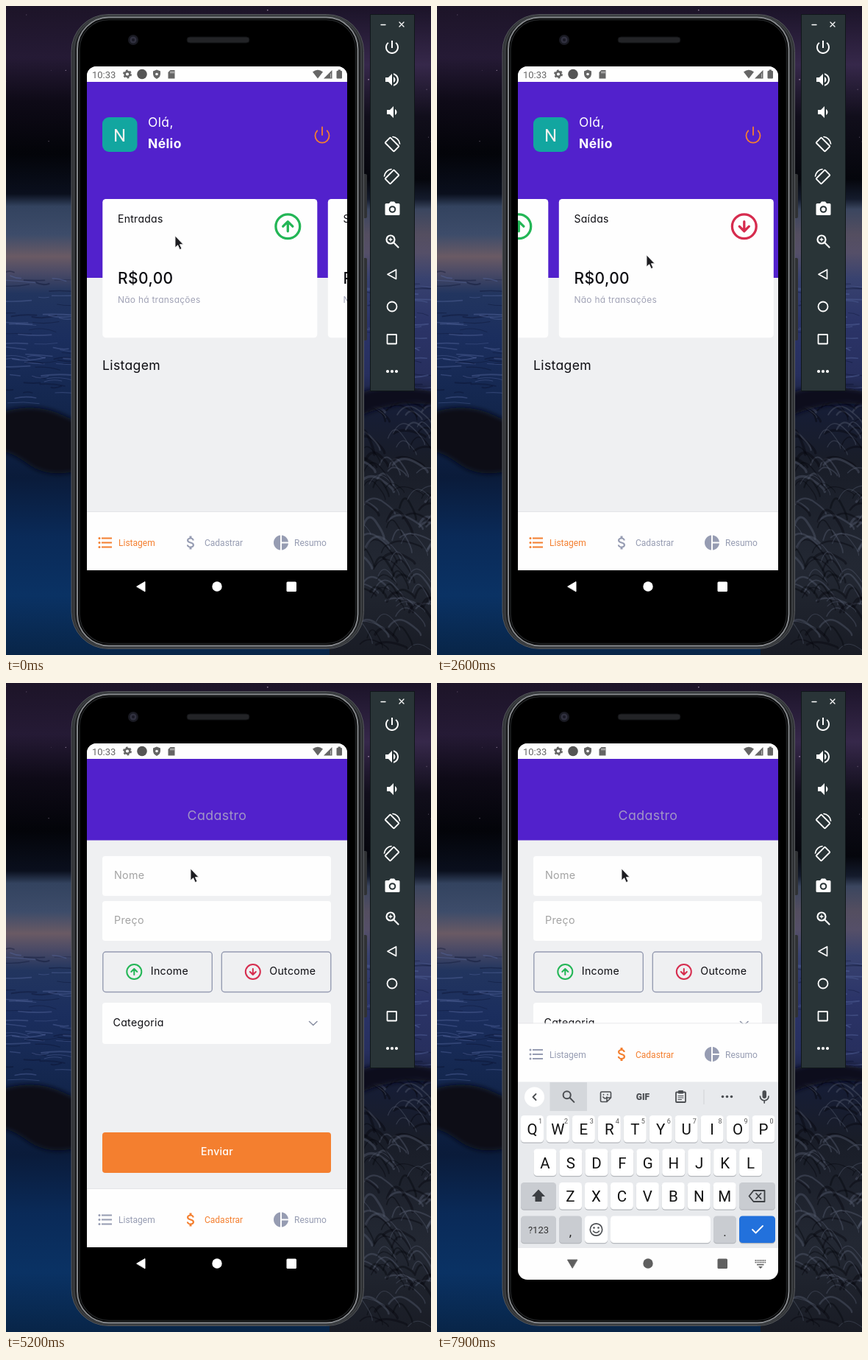
An HTML page that plays this animation: 578 by 881 pixels, repeating every 8000 ms.

```html
<!DOCTYPE html>
<html lang="pt-BR">
<head>
<meta charset="utf-8">
<title>Finanças</title>
<style>
  html, body { margin: 0; width: 100%; height: 100%; overflow: hidden; background: #000; }
  svg { position: fixed; left: 0; top: 0; display: block; }
  text { font-family: Inter, "Open Sans", sans-serif; letter-spacing: .02em; font-feature-settings: "cv11"; }
  .r text, text.r { font-family: Roboto, Arial, sans-serif; letter-spacing: 0; }
  .mid { text-anchor: middle; }
</style>
</head>
<body>
<svg id="stage" width="578" height="881" viewBox="0 0 578 881"></svg>
<script>
const ORANGE = '#f47f2f', PURPLE = '#5221cc', GREEN = '#23b656', RED = '#d62c4e', MUTED = '#969cb2';
const LOOP = 8000, STEP = 100;

// ---------- helpers ----------
const rect = (x, y, w, h, fill, rx = 0, more = '') =>
  `<rect x="${x}" y="${y}" width="${w}" height="${h}" rx="${rx}" fill="${fill}" ${more}/>`;
const circle = (x, y, r, fill, more = '') => `<circle cx="${x}" cy="${y}" r="${r}" fill="${fill}" ${more}/>`;
const text = (x, y, size, str, fill = '#0d0d12', more = '') =>
  `<text x="${x}" y="${y}" font-size="${size}" fill="${fill}" ${more}>${str}</text>`;
const line = (d, color, w = 2, more = '') =>
  `<path d="${d}" fill="none" stroke="${color}" stroke-width="${w}" stroke-linecap="round" stroke-linejoin="round" ${more}/>`;
const shape = (d, fill = '#fff', more = '') => `<path d="${d}" fill="${fill}" ${more}/>`;
const at = (x, y, body, scale = 1) => `<g transform="translate(${x} ${y}) scale(${scale})">${body}</g>`;
// 24-unit icon centred on a point
const icon = (x, y, scale, body) => at(x, y, `<g transform="translate(-12 -12)">${body}</g>`, scale);
const grad = (id, stops) => `<linearGradient id="${id}" x1="0" y1="0" x2="0" y2="881" gradientUnits="userSpaceOnUse">` +
  stops.map(([y, c]) => `<stop offset="${y / 881}" stop-color="${c}"/>`).join('') + '</linearGradient>';

let seed = 11;
const rnd = (a = 0, b = 1) => {
  seed = (seed * 16807) % 2147483647;
  return a + (b - a) * seed / 2147483647;
};
const many = (n, fn) => Array.from({ length: n }, (_, i) => fn(i)).join('');

// ---------- icons ----------
const arrow = (up, c) => line('M22 12A10 10 0 1 1 2 12A10 10 0 1 1 22 12', c) +
  line(up ? 'M12 16V8M8 12L12 8L16 12' : 'M12 8V16M8 12L12 16L16 12', c);
const dollar = line('M12 1V23M17 5H9.5a3.5 3.5 0 0 0 0 7h5a3.5 3.5 0 0 1 0 7H6', '#fff');
const money = shape('M11.8 10.9c-2.27-.59-3-1.2-3-2.15 0-1.09 1.01-1.85 2.7-1.85 1.78 0 2.44.85 2.5 2.1h2.21c-.07-1.72-1.12-3.3-3.21-3.81V3h-3v2.16c-1.94.42-3.5 1.68-3.5 3.61 0 2.31 1.91 3.46 4.7 4.13 2.5.6 3 1.48 3 2.41 0 .69-.49 1.79-2.7 1.79-2.06 0-2.87-.92-2.98-2.1h-2.2c.12 2.19 1.76 3.42 3.68 3.83V21h3v-2.15c1.95-.37 3.5-1.5 3.5-3.55 0-2.84-2.43-3.81-4.7-4.4z', 'currentColor');
const pie = shape('M11 2v20c-5.07-.5-9-4.79-9-10s3.93-9.5 9-10zm2.03 0v8.99H22c-.47-4.74-4.24-8.52-8.97-8.99zm0 11.01V22c4.74-.47 8.5-4.25 8.97-8.99z', 'currentColor');
const list = many(3, i => circle(4, 6 + i * 6, 1.5, 'currentColor') + rect(7, 5 + i * 6, 14, 2, 'currentColor'));
const power = line('M18.36 6.64a9 9 0 1 1-12.73 0M12 2V12', ORANGE, 1.7);
const lens = c => line('M15 9.5A5.5 5.5 0 1 1 4 9.5A5.5 5.5 0 1 1 15 9.5M14 14L20 20', c, 2.2);
const dots = (x, y, c, r = 1.8) => [-6, 0, 6].map(d => circle(x + d, y, r, c)).join('');

// ---------- wallpaper ----------
function wallpaper() {
  const left = [[0, '#1d1428'], [70, '#251a35'], [130, '#0e0a17'], [200, '#030409'], [255, '#0a0f1d'], [272, '#33435f'],
    [310, '#3d4c6a'], [340, '#6a5a64'], [362, '#4a4a66'], [390, '#22355f'], [450, '#1b2e5e'], [535, '#14274f'],
    [640, '#0a1b3a'], [720, '#0a2a58'], [800, '#0a3264'], [881, '#082548']];
  const right = [[0, '#1b1328'], [80, '#36284a'], [150, '#110e1b'], [235, '#05060c'], [262, '#141b2c'], [276, '#3b465f'],
    [310, '#544e60'], [335, '#554f68'], [370, '#38426f'], [430, '#2b3468'], [500, '#272f5e'], [545, '#161d36'],
    [620, '#191d28'], [760, '#232833'], [881, '#191c25']];
  const stars = many(40, () => circle(rnd(0, 578), rnd(0, 230), rnd(.3, .9), '#c9b4cf', `opacity="${rnd(.2, .8)}"`));
  const ripples = many(130, () => {
    const x = rnd() < .5 ? rnd(-20, 80) : rnd(478, 560), y = rnd(360, 540), w = rnd(12, 45);
    return line(`M${x} ${y}q${w / 2} ${rnd(-5, 5)} ${w} ${rnd(-2, 4)}`, rnd() < .5 ? '#5a6ca4' : '#0a1230', rnd(.8, 2.2), 'opacity=".4"');
  });
  const rock = many(120, () => {
    const x = rnd(465, 575), y = rnd(535, 880), w = rnd(12, 30), h = rnd(6, 26);
    return line(`M${x} ${y}q${w * .4} ${-h} ${w} ${-h * .3}t${w * .6} ${h}`,
      rnd() < .5 ? '#565e70' : '#05070c', rnd(1, 3.5), 'opacity=".42"');
  });
  return `<defs>${grad('wl', left)}${grad('wr', right)}
    <filter id="soft" x="-30%" y="-30%" width="160%" height="160%"><feGaussianBlur stdDeviation="3"/></filter></defs>` +
    rect(0, 0, 578, 881, 'url(#wl)') + rect(440, 0, 138, 881, 'url(#wr)') + stars + ripples + rock +
    `<g filter="url(#soft)">${shape('M-20 556Q30 536 70 552T110 580V628Q60 644 30 622T-20 604Z', '#070a14')}
     ${shape('M470 530Q520 505 600 528V545Q530 530 470 562Z', '#0b0f1d')}</g>`;
}

// ---------- phone body and emulator bar ----------
const body =
  rect(485, 228, 6, 60, '#303235', 2) + rect(485, 342, 6, 112, '#303235', 2) +
  rect(89, 11.5, 397.5, 861, '#2d2f32', 50, 'stroke="#56595d"') +
  rect(92.5, 13.5, 390.5, 857, '#1a1b1d', 47, 'stroke="#3b3e41" stroke-width="2.5"') +
  rect(97, 15.5, 381.5, 853, '#000', 43, 'stroke="#84878b" stroke-width="2"') +
  rect(100, 18.5, 375.5, 847, '#000', 40, 'stroke="#222426" stroke-width="1.5"') +
  circle(173, 46, 7, '#191a22') + circle(173, 46, 4.5, '#30303f') + circle(173, 46, 2, '#191924') +
  rect(246, 42, 85, 8, '#222326', 4, 'stroke="#111214"');

const turn = `<rect x="-8.500" y="-5" width="17" height="10" rx="1" transform="rotate(45)" fill="none" stroke="#fff" stroke-width="1.9"/>` +
  line('M1 -10.500A11 11 0 0 1 10.500 -1', '#fff', 1.7);
const toolbar = rect(495.5, 11.5, 60, 511, '#293437', 0, 'stroke="#10171a"') +
  line('M510 25.5H516M535 22L541 28M541 22L535 28', '#fff', 1.3) +
  icon(525, 56, 1, shape('M13 3h-2v10h2V3zm4.83 2.17l-1.42 1.42C17.99 7.86 19 9.81 19 12c0 3.87-3.13 7-7 7s-7-3.13-7-7c0-2.19 1.01-4.14 2.58-5.42L6.17 5.17C4.23 6.82 3 9.26 3 12c0 4.97 4.03 9 9 9s9-4.03 9-9c0-2.74-1.23-5.18-3.17-6.83z')) +
  icon(525, 100, 1, shape('M3 9v6h4l5 5V4L7 9H3zm13.5 3c0-1.77-1.02-3.29-2.5-4.03v8.05c1.48-.73 2.5-2.25 2.5-4.02zM14 3.23v2.06c2.89.86 5 3.54 5 6.71s-2.11 5.85-5 6.71v2.06c4.01-.91 7-4.49 7-8.77s-2.99-7.86-7-8.77z')) +
  icon(525, 144, 1, shape('M18.5 12c0-1.77-1.02-3.29-2.5-4.03v8.05c1.48-.73 2.5-2.25 2.5-4.02zM5 9v6h4l5 5V4L9 9H5z')) +
  at(525, 188, turn) + `<g transform="translate(525 232) scale(-1 1)">${turn}</g>` +
  shape('M517 268h4l2-2.5h5l2 2.5h4q1.5 0 1.5 1.5v13q0 1.5-1.5 1.5h-17q-1.5 0-1.5-1.5v-13q0-1.5 1.5-1.5Z') +
  circle(525.5, 276, 3.8, '#fff', 'stroke="#293437" stroke-width="2"') +
  icon(525.5, 319.5, 1, lens('#fff') + line('M7.5 9.5H11.5M9.5 7.5V11.5', '#fff', 1.3)) +
  line('M530.5 358V370.5L519 364.2Z', '#fff', 1.7) + circle(525, 408, 6.5, 'none', 'stroke="#fff" stroke-width="1.8"') +
  rect(518.5, 446, 12.5, 12.5, 'none', .5, 'stroke="#fff" stroke-width="1.8"') + dots(525, 496, '#fff', 2.1);

// ---------- app screens ----------
const INK = '#656565';
const status = rect(110, 82, 354, 21, '#fefefe') + text(117, 97.5, 13, '10:33', INK, 'class="r"') +
  circle(165, 92.5, 3.4, 'none', `stroke="${INK}" stroke-width="2.6"`) +
  circle(165, 92.5, 5, 'none', `stroke="${INK}" stroke-width="2" stroke-dasharray="2.6 2.636"`) +
  circle(185, 92.5, 6.8, '#555') +
  shape('M205 86.5L210 88.5V92.5Q209.5 97 205 99Q200.5 97 200 92.5V88.5Z', INK) + circle(205, 92.5, 1.8, '#fefefe') +
  shape('M223.5 87H229.5V98.5H220.5V90Z', INK) + line('M224 89V91M226 89V91M228 89V91', '#fefefe', .8) +
  shape('M417 89.5Q424 84 431 89.5L424 98.5Z', INK) + shape('M443.5 87V98.5H432Z', INK) + line('M441.5 92V97', '#bbb', 1) +
  rect(449.5, 88, 7.5, 10.5, INK, 1) + rect(451.5, 86.5, 3.5, 2, INK);

function card(i, title, bg, ink, note, glyph) {
  return at(131.3 + i * 306.5, 262, rect(0, 0, 292, 188.3, bg, 4.5) + text(20.7, 32, 14, title, ink) +
    text(20.7, 115, 21, 'R$0,00', ink, 'font-weight="500"') + text(20.7, 141, 12, 'Não há transações', note) +
    icon(252, 37.2, 1.64, glyph));
}
const home = rect(110, 103, 354, 266, PURPLE) +
  rect(131, 151, 47.5, 47, '#12a6a0', 9) + text(154.5, 184, 24, 'N', '#f4f1ee', 'class="r mid"') +
  text(193, 164, 17.5, 'Olá,', '#fff') + text(193, 193, 17.5, 'Nélio', '#fff', 'font-weight="700"') +
  icon(430, 175, 1.06, power) +
  `<g id="cards">${card(0, 'Entradas', '#fefefe', '#0d0d12', '#a1a3b6', arrow(true, GREEN))}` +
  card(1, 'Saídas', '#fefefe', '#0d0d12', '#a1a3b6', arrow(false, RED)) +
  card(2, 'Total', ORANGE, '#fff', '#fff', dollar) + '</g>' +
  shape('M458 262Q427 356 458 450H464V262Z', '#e2dfe9', 'id="glow"') +
  text(131, 493.5, 17.6, 'Listagem');

const choice = (x, name, up) => rect(x, 365, 148.5, 54.5, 'none', 4, 'stroke="#969cb2" stroke-width="1.4"') +
  icon(x + 42.5, 392, 1, arrow(up, up ? GREEN : RED)) + text(x + 65, 396, 14.2, name);
const form = rect(110, 103, 354, 110.5, PURPLE) + text(287, 186, 17.8, 'Cadastro', '#a195c6', 'class="mid"') +
  rect(131, 235, 311, 54, '#fefefe', 4) + text(147, 265.5, 14.3, 'Nome', '#a3a3a3') +
  rect(131, 296, 311, 54, '#fefefe', 4) + text(147, 326.5, 14.3, 'Preço', '#a3a3a3') +
  rect(147, 250, 2, 24, '#0f9b8c', 0, 'id="caret"') +
  choice(131.8, 'Income', true) + choice(293.3, 'Outcome', false) +
  rect(131, 434, 311, 56, '#fefefe', 4) + text(145.5, 465.5, 14.2, 'Categoria') +
  line('M412.5 459.5L417.8 464.5L423 459.5', '#8d93a5', 1.6) +
  rect(131, 610, 311, 55, ORANGE, 4) + text(287, 641, 14, 'Enviar', '#fff', 'class="mid" font-weight="500"');

const tab = (id, iconX, textX, glyph, name) => `<g id="${id}">${icon(iconX, 728.5, 1, glyph)}` +
  text(textX, 733, 12, name, 'currentColor') + '</g>';
const tabs = `<g id="tabs" class="r">${rect(110, 686, 354, 1, '#e3e4e8')}${rect(110, 687, 354, 310, '#fefefe')}` +
  tab('tabList', 135, 153, list, 'Listagem') + tab('tabAdd', 251.5, 270, money, 'Cadastrar') +
  tab('tabSum', 374, 392, pie, 'Resumo') + '</g>';

// ---------- keyboard ----------
const KEY = '#fff', ALT = '#c9ccd1', DARK = '#4b4e52';
const key = (x, y, w, fill = KEY, body = '') =>
  rect(x, y + 1.2, w, 36.5, '#b5b8bd', 4.5) + rect(x, y, w, 36.5, fill, 4.5) + at(x + w / 2, y + 18.5, body);
const keyRow = (letters, x0, y, nums) => [...letters].map((c, i) =>
  key(x0 + i * 34.95, y, 31, KEY, text(0, 7.5, 20.5, c, '#111', 'class="mid"') +
    (nums ? text(11, -8, 9, (i + 1) % 10, '#555', 'class="mid"') : ''))).join('');
const board = `<g id="board" class="r">${rect(110, 541.5, 354, 226, '#e8eaed')}${rect(110, 767, 354, 300, '#fefefe')}` +
  rect(153.5, 542, 50.5, 39, '#d4d7db') + circle(132.5, 562, 13.5, '#fff') + line('M134.5 558L130.5 562L134.5 566', DARK, 1.8) +
  icon(179, 561.5, .92, lens(DARK)) +
  line('M224 555H235Q236.5 555 236.5 556.5V563L231 568.5H224Q222.5 568.5 222.5 567V556.5Q222.5 555 224 555ZM236 563H231V568M226 562Q229 566 231 562M226.5 558.5V559M232 558.5V559', DARK, 1.6) +
  text(280, 565.5, 12, 'GIF', DARK, 'class="mid" font-weight="900"') +
  rect(325, 555.5, 13, 13.5, 'none', 1, `stroke="${DARK}" stroke-width="1.8"`) + rect(328, 553, 7, 4.5, DARK, 1) +
  line('M328 560.5H335M328 563H335M328 565.5H332.5', DARK, 1.1) + rect(362.5, 552, 1, 20, '#cfd2d6') +
  dots(394.5, 561.5, DARK) +
  rect(442.5, 553, 5.5, 11, DARK, 2.75) + line('M439.5 561A5.7 5.7 0 0 0 451 561M445.2 567V570', DARK, 1.7) +
  keyRow('QWERTYUIOP', 114, 587, true) + keyRow('ASDFGHJKL', 131.5, 632.5) +
  key(114, 678, 48, ALT, shape('M0 -9L9 .5H4.5V7.5H-4.5V.5H-9Z', '#3c3f43')) + keyRow('ZXCVBNM', 166, 678) +
  key(411, 678, 49, ALT, line('M-5 -7.5H10V7.5H-5L-11 0ZM-1.5 -3.5L5 3.5M5 -3.5L-1.5 3.5', '#3c3f43', 1.8)) +
  key(114, 723.5, 48, ALT, text(0, 5, 13, '?123', '#333', 'class="mid"')) +
  key(166, 723.5, 31, ALT, text(0, 9, 17, ',', '#222', 'class="mid"')) +
  key(201, 723.5, 31, KEY, circle(0, 0, 8.2, 'none', `stroke="${DARK}" stroke-width="1.7"`) +
    circle(-3, -2.5, 1.3, DARK) + circle(3, -2.5, 1.3, DARK) + line('M-4 2Q0 6.5 4 2', DARK, 1.6)) +
  key(236, 723.5, 136) + key(376, 723.5, 31, ALT, text(0, 9, 17, '.', '#222', 'class="mid"')) +
  key(411, 723.5, 49, '#2271dc', line('M-6.5 0L-2 4.5L7.5 -5', '#fff', 1.8)) + '</g>';

const nav = '<g id="nav">' +
  at(184, 788, `<g id="back">${line('M-6 0L5 -6.5V6.5Z', 'currentColor', 1)}${shape('M-6 0L5 -6.5V6.5Z', 'currentColor')}</g>`) +
  circle(287, 788, 6.7, 'currentColor') + rect(381.5, 781.5, 13.5, 13.5, 'currentColor', 1.5) +
  `<g id="imeKey">${many(14, i => rect(432.5 + (i % 7) * 2.2, 783 + Math.floor(i / 7) * 2.7, 1.5, 1.6, 'currentColor'))}` +
  rect(435, 788.8, 9.5, 1.6, 'currentColor') + shape('M437 792H443L440 795Z', 'currentColor') + '</g></g>';

const cursor = `<g id="cursor">${shape('M0 0V16L3.7 12.7L6.3 18.6L9 17.4L6.4 11.7H11.2Z', '#1c1c20', 'stroke="#f2f2f2" stroke-width=".9" stroke-linejoin="round"')}</g>`;

document.getElementById('stage').innerHTML = wallpaper() + body +
  `<clipPath id="screen">${rect(110, 82, 354, 728, '#000', 13)}</clipPath>
   <clipPath id="app">${rect(110, 82, 354, 684, '#000')}</clipPath>
   <g clip-path="url(#screen)"><g clip-path="url(#app)">${rect(110, 82, 354, 684, '#eff0f2')}
   <g id="home">${home}</g><g id="form">${form}</g>${status}${tabs}</g>${board}${nav}</g>` + toolbar + cursor;

// ---------- motion: [time, value, ...] ----------
const POINTER = [[0, 230, 312], [700, 230, 312], [800, 221, 302], [1000, 221, 302], [1300, 380, 345], [1400, 380, 345],
  [1500, 370, 344], [1700, 300, 342], [1900, 215, 340], [2000, 200, 340], [2300, 353, 342], [2400, 353, 342],
  [2500, 330, 340], [2700, 240, 336], [2800, 190, 334], [2900, 179, 333], [3000, 205, 400], [3200, 323, 635],
  [3300, 323, 635], [3400, 312, 690], [3500, 302, 731], [3800, 302, 731], [3900, 303, 731], [4600, 303, 731],
  [4700, 285, 600], [4800, 262, 480], [5000, 262, 480], [5100, 256, 340], [5200, 251, 252]];
const SCROLL = [[1400, 0], [1500, -10], [1700, -80], [1900, -165], [2000, -182], [2100, -196], [2200, -202.4], [2400, -202.4],
  [2500, -226], [2700, -318], [2800, -460], [2900, -608.5]];
const GLOW = [[2800, 0], [2900, .2], [3200, 0]];
const BOARD = [[6200, 268, 0], [6300, 150.5, .3], [6400, 75, .6], [6500, 30, .85], [6600, 8, 1], [6700, 0, 1]];

function track(keys, t) {
  if (t <= keys[0][0]) return keys[0].slice(1);
  const n = keys.findIndex(k => k[0] > t);
  if (n < 0) return keys[keys.length - 1].slice(1);
  const a = keys[n - 1], b = keys[n], u = (t - a[0]) / (b[0] - a[0]);
  return a.slice(1).map((v, i) => v + (b[i + 1] - v) * u);
}

const el = id => document.getElementById(id);
const move = (id, x, y) => el(id).setAttribute('transform', `translate(${x} ${y})`);
const show = (id, on) => { el(id).style.display = on ? '' : 'none'; };
const tint = (id, c) => { el(id).style.color = c; };

function render(t) {
  const adding = t >= 4200, typing = t >= 6200;
  move('cursor', ...track(POINTER, t));
  move('cards', track(SCROLL, t)[0], 0);
  el('glow').style.opacity = track(GLOW, t)[0];
  show('home', t < 4400);
  show('form', t >= 4400);
  show('caret', (t >= 6100 && t < 6700) || (t >= 7200 && t < 7900));
  tint('tabList', adding ? MUTED : ORANGE);
  tint('tabAdd', adding ? ORANGE : MUTED);
  tint('tabSum', MUTED);
  move('tabs', 0, typing ? -224.5 : 0);

  const [y, alpha] = track(BOARD, t);
  move('board', 0, y);
  el('board').style.opacity = alpha;
  const tone = Math.round(255 - 160 * Math.min(1, alpha * 1.15));
  tint('nav', `rgb(${tone},${tone},${tone})`);
  el('back').setAttribute('transform', `rotate(${t >= 6500 ? -90 : 0})`);
  show('imeKey', typing);
}

function tick() {
  const t = performance.now() % LOOP;
  render(Math.floor(t / STEP) * STEP);
  requestAnimationFrame(tick);
}
tick();
</script>
</body>
</html>
```
